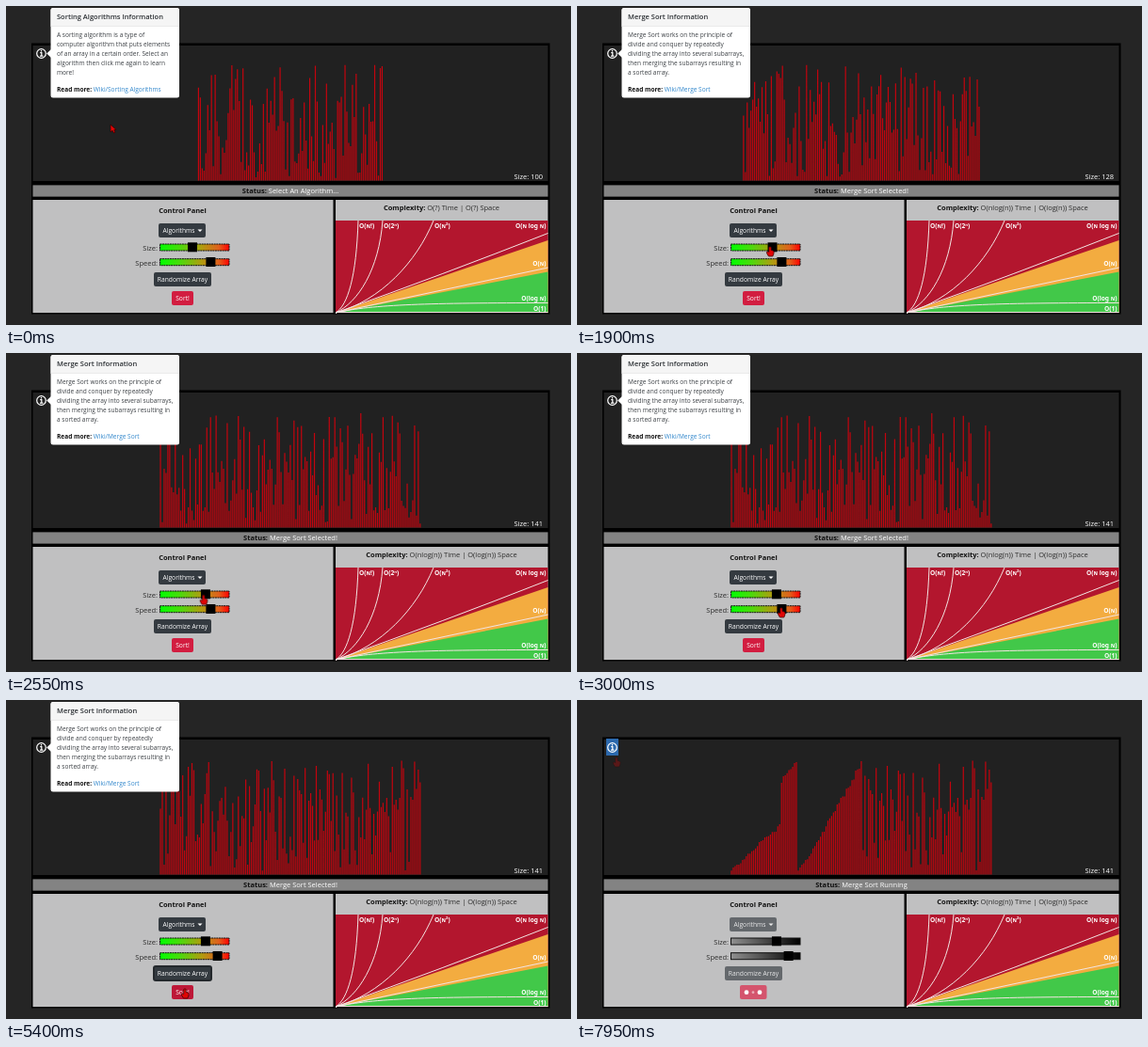
Recreate the animation shown at these times as an HTML page. Size 600 by 339 pixels, loop 8 s.

```html
<!DOCTYPE html>
<html lang="en">
<head>
<meta charset="utf-8">
<title>Sorting visualizer</title>
<style>
  html, body { margin: 0; width: 100%; height: 100%; overflow: hidden; background: #252525; }
  svg { display: block; width: 100vw; height: 100vh; font-family: "Open Sans", "Noto Sans", sans-serif; }
  .ui { font-size: 7.5px; fill: #2b2b2b; }
  .bold { font-weight: 600; }
  .black { font-weight: 700; fill: #111; }
  .white { fill: #fff; }
  .mid { text-anchor: middle; }
  .end { text-anchor: end; }
  .btn text { font-size: 6.7px; fill: #fff; text-anchor: middle; }
  .dark { fill: #343a40; }
  .track { fill: url(#heat); stroke: #111; stroke-dasharray: 2 .6; }
  .curve { fill: none; stroke: #f3e4e2; stroke-width: 1; }
  .label { font: 600 6.6px "Noto Sans", "Open Sans", sans-serif; fill: #fff; }
  .running .btn { opacity: .65; }
  .running .track { fill: url(#gray); stroke-dasharray: none; }
  .focus rect { stroke: #24282c; stroke-width: 2; }
  #sortRunning, .running #sortIdle { display: none; }
  .running #sortRunning { display: inline; }

  #popover, #selection, #cursor, #arrow, #hand { animation: 8s infinite; }
  #popover { animation-name: close; animation-timing-function: linear; }
  #selection { animation-name: select; animation-timing-function: step-end; }
  #cursor { animation-name: travel; animation-timing-function: ease-in-out; }
  #arrow { animation-name: arrow; animation-timing-function: step-end; }
  #hand { animation-name: hand; animation-timing-function: step-end; }

  @keyframes close { 0%, 94% { opacity: 1; } 95.9%, 100% { opacity: 0; } }
  @keyframes select { 0% { opacity: 0; } 94% { opacity: 1; } }
  @keyframes arrow { 0% { opacity: 1; } 5.5% { opacity: 0; } 72% { opacity: 1; } 92.5% { opacity: 0; } }
  @keyframes hand { 0% { opacity: 0; } 5.5% { opacity: 1; } 72% { opacity: 0; } 92.5% { opacity: 1; } 96% { opacity: .3; } }
  @keyframes travel {
    0% { transform: translate(111px, 126px); }
    6.25%, 9% { transform: translate(187px, 234px); }
    14.5%, 16% { transform: translate(200px, 290px); }
    20% { transform: translate(196px, 256px); animation-timing-function: linear; }
    27.5% { transform: translate(214px, 256px); animation-timing-function: linear; }
    31% { transform: translate(209px, 256px); }
    35% { transform: translate(217px, 269px); }
    38% { transform: translate(217px, 271px); animation-timing-function: linear; }
    43%, 48.5% { transform: translate(225px, 271px); }
    52%, 62% { transform: translate(187px, 287px); }
    66.5%, 69.4% { transform: translate(190px, 307px); }
    78%, 86% { transform: translate(113px, 299px); }
    93%, 95% { transform: translate(38px, 51px); }
    98%, 100% { transform: translate(42px, 61px); }
  }
</style>
</head>
<body>
<svg id="app" viewBox="0 0 600 339">
  <defs>
    <linearGradient id="heat">
      <stop offset="0" stop-color="#0f0"/><stop offset=".3" stop-color="#4ed80c"/>
      <stop offset=".6" stop-color="#b09c10"/><stop offset=".85" stop-color="#e0601c"/>
      <stop offset="1" stop-color="#f00"/>
    </linearGradient>
    <linearGradient id="gray">
      <stop offset="0" stop-color="#909090"/><stop offset="1" stop-color="#000"/>
    </linearGradient>
  </defs>

  <rect width="600" height="339" fill="#252525"/>
  <rect x="27" y="39.5" width="550.5" height="288"/>
  <rect x="28.5" y="42" width="547" height="144" fill="#212121"/>
  <rect x="28.5" y="190.4" width="547" height="12.2" fill="#838383"/>
  <rect x="28.5" y="206" width="319" height="120" fill="#c0c0c1"/>
  <rect x="350" y="206" width="225.5" height="120" fill="#c0c0c1"/>

  <path id="bars" fill="#c4040e"/>
  <text id="size" class="ui white end" x="570" y="183.5"></text>
  <text class="ui mid" x="302" y="199.4"><tspan class="black">Status:</tspan> <tspan id="status" class="white"></tspan></text>

  <text class="ui black mid" x="187.5" y="219.8">Control Panel</text>
  <g class="btn">
    <rect class="dark" x="162" y="231" width="50" height="15" rx="2"/>
    <text x="183.5" y="241">Algorithms</text>
    <path d="M203.5 237.5h5l-2.5 2.6z" fill="#fff"/>
  </g>
  <text class="ui end" x="161" y="259.8">Size:</text>
  <rect class="track" x="163.5" y="253" width="73.5" height="7"/>
  <rect id="sizeThumb" y="251.3" width="10" height="10"/>
  <text class="ui end" x="161" y="275.8">Speed:</text>
  <rect class="track" x="163.5" y="268.7" width="73.5" height="7"/>
  <rect id="speedThumb" y="267" width="10" height="10"/>
  <g id="randomize" class="btn">
    <rect class="dark" x="157" y="283" width="61" height="15" rx="2"/>
    <text x="187.5" y="293">Randomize Array</text>
  </g>
  <g id="sortIdle" class="btn">
    <rect id="sortFace" x="176" y="303" width="23" height="15" rx="2"/>
    <text x="187.5" y="313">Sort!</text>
  </g>
  <g id="sortRunning">
    <rect x="173" y="303" width="28.5" height="15" rx="2" fill="#d4546d"/>
    <g id="dots" fill="#fff">
      <circle cx="180" cy="310.7"/><circle cx="187" cy="310.7"/><circle cx="194" cy="310.7"/>
    </g>
  </g>

  <text class="ui mid" x="462.5" y="217"><tspan class="black">Complexity:</tspan> <tspan id="complexity"></tspan></text>
  <rect x="350" y="228" width="225.5" height="98" fill="#b3162e"/>
  <path d="M350 326L575.5 249V326z" fill="#f3ac40"/>
  <path d="M350 326L575.5 282.5V326z" fill="#42c849"/>
  <g class="curve">
    <path d="M350 326C363 318 372 288 374 228"/>
    <path d="M350 326C374 315 396 280 400 228"/>
    <path d="M350 326C398 313 436 272 454 228"/>
    <path d="M350 326Q465 285 575.5 241.5"/>
    <path d="M350 326L575.5 278"/>
    <path d="M350 326C390 317 450 315.500 575.500 315.500"/>
    <path d="M350 325.500H575.500"/>
  </g>
  <g class="label">
    <text x="375" y="236.3">O(ɴ!)</text>
    <text x="401" y="236.3">O(2ⁿ)</text>
    <text x="455" y="236.3">O(ɴ²)</text>
    <text class="end" x="573.5" y="236.3">O(ɴ log ɴ)</text>
    <text class="end" x="573.5" y="276">O(ɴ)</text>
    <text class="end" x="573.5" y="313.3">O(log ɴ)</text>
    <text class="end" x="573.5" y="324.3">O(1)</text>
  </g>

  <rect id="selection" x="31" y="41" width="13" height="18" fill="#2c69ad"/>
  <g fill="none" stroke="#fff" stroke-width="1.2">
    <circle cx="37.5" cy="50.5" r="4.8"/>
    <path d="M36.2 49.6h1.6v3.6m-1.8 0h3.4M37.5 47v1.4"/>
  </g>

  <g id="popover">
    <path d="M43.2 50.5L48 46v9z" fill="#fff"/>
    <rect x="47.5" y="2" width="136.5" height="95.5" rx="2.5" fill="#fff"/>
    <path d="M47.5 21.5V4.5a2.5 2.5 0 0 1 2.5-2.5h131.5a2.5 2.5 0 0 1 2.5 2.5V21.5z" fill="#f5f5f5"/>
    <path d="M47.5 21.5H184" stroke="#e4e4e4" stroke-width=".7"/>
    <text id="title" class="bold" x="54" y="14.4" font-size="7.5" fill="#2b2f33"></text>
    <g id="lines" font-size="6.55" fill="#3c4045"></g>
    <text x="54" y="90.7" font-size="6.55"><tspan class="black">Read more:</tspan> <tspan id="link" fill="#3388cc"></tspan></text>
  </g>

  <g id="cursor" fill="#e00505" stroke="#300" stroke-width=".7">
    <path id="arrow" d="M0 0V8L2 6.3 3.5 9 5 8.3 3.8 5.7 6 5.5z"/>
    <path id="hand" d="M-1.3 .5Q0-1 1.2 .5V3.5Q4 3.5 4.2 5.5 4 8 2.8 10H-1.5Q-3.5 7.5-3.8 5.5-3 4.3-1.3 5.5z"/>
  </g>
</svg>

<script>
const LOOP = 8000, PICK = 1150, SORT_START = 5550, WRITES_PER_MS = 0.165;
const PITCH = 1.97, BAR = 1.2, BASE = 185.5, PEAK = 123;
const el = id => document.getElementById(id);

const general = {
  title: 'Sorting Algorithms Information',
  lines: ['A sorting algorithm is a type of', 'computer algorithm that puts elements',
    'of an array in a certain order. Select an', 'algorithm then click me again to learn', 'more!'],
  link: 'Wiki/Sorting Algorithms',
  complexity: 'O(?) Time | O(?) Space'
};
const merge = {
  title: 'Merge Sort Information',
  lines: ['Merge Sort works on the principle of', 'divide and conquer by repeatedly',
    'dividing the array into several subarrays,', 'then merging the subarrays resulting in', 'a sorted array.'],
  link: 'Wiki/Merge Sort',
  complexity: 'O(nlog(n)) Time | O(log(n)) Space'
};

function randomizer(seed) {
  return () => {
    seed = (seed + 0x6D2B79F5) | 0;
    let x = Math.imul(seed ^ (seed >>> 15), 1 | seed);
    x ^= x + Math.imul(x ^ (x >>> 7), 61 | x);
    return ((x ^ (x >>> 14)) >>> 0) / 4294967296;
  };
}

function randomArray(size, seed) {
  const random = randomizer(seed);
  return Array.from({ length: size }, () => 2 + (PEAK - 2) * random());
}

// Values spread unevenly along a power curve, in shuffled order.
function shuffledRamp(count, power, random) {
  const ramp = Array.from({ length: count }, (_, i) =>
    2 + (PEAK - 2) * ((i + 2 * random()) / (count + 1)) ** power);
  for (let i = count - 1; i > 0; i--) {
    const j = Math.floor(random() * (i + 1));
    [ramp[i], ramp[j]] = [ramp[j], ramp[i]];
  }
  return ramp;
}

function mergeSort(a, lo, hi, writes) {
  if (lo >= hi) return;
  const middle = (lo + hi) >> 1;
  mergeSort(a, lo, middle, writes);
  mergeSort(a, middle + 1, hi, writes);
  const left = a.slice(lo, middle + 1), right = a.slice(middle + 1, hi + 1);
  for (let k = lo; k <= hi; k++) {
    const fromLeft = !right.length || (left.length && left[0] <= right[0]);
    a[k] = (fromLeft ? left : right).shift();
    writes.push([k, a[k]]);
  }
}

const random = randomizer(77);
const finalArray = [...shuffledRamp(36, 0.75, random), ...shuffledRamp(35, 1.1, random), ...randomArray(70, 9)];
const writes = [];
mergeSort(finalArray.slice(), 0, finalArray.length - 1, writes);

function ramp(t, t0, t1, from, to) {
  const p = Math.min(1, Math.max(0, (t - t0) / (t1 - t0)));
  return from + (to - from) * p;
}

function sizeAt(t) {
  const tick = Math.floor(t / 50) * 50;
  return Math.round(tick < 2250 ? ramp(tick, 1600, 2200, 100, 156) : ramp(tick, 2250, 2480, 156, 141));
}

function arrayAt(t) {
  const size = sizeAt(t);
  if (t < 4200) return randomArray(size, size * 31);
  if (t < 4800) return randomArray(size, t < 4500 ? 5 : 6);
  const a = finalArray.slice();
  const done = Math.max(0, Math.floor((t - SORT_START) * WRITES_PER_MS));
  for (const [i, value] of writes.slice(0, done)) a[i] = value;
  return a;
}

function setText(id, text) {
  if (el(id).textContent !== text) el(id).textContent = text;
}

const svgLines = general.lines.map((_, i) => {
  const line = document.createElementNS(el('app').namespaceURI, 'text');
  line.setAttribute('x', 54);
  line.setAttribute('y', 32.5 + 10.2 * i);
  el('lines').append(line);
  return line;
});

let shown;
function showInfo(info) {
  if (shown === info) return;
  shown = info;
  for (const key of ['title', 'link', 'complexity']) setText(key, info[key]);
  svgLines.forEach((line, i) => line.textContent = info.lines[i]);
}

function drawDots(t) {
  const wave = Math.abs(1 - 2 * ((t - SORT_START) / 800 % 1));
  [...el('dots').children].forEach((dot, i) => {
    const swell = i === 1 ? 1 - wave : wave;
    dot.setAttribute('r', 1.4 + swell);
    dot.setAttribute('fill-opacity', 0.5 + swell / 2);
  });
}

function render(t) {
  const running = t >= SORT_START, a = arrayAt(t);
  const left = 302.3 - a.length * PITCH / 2;
  el('bars').setAttribute('d', a.map((h, i) =>
    `M${(left + i * PITCH).toFixed(2)} ${BASE}v${(-h).toFixed(1)}h${BAR}v${h.toFixed(1)}z`).join(''));
  setText('size', 'Size: ' + a.length);
  setText('status', t < PICK ? 'Select An Algorithm...' : running ? 'Merge Sort Running' : 'Merge Sort Selected!');
  showInfo(t < PICK ? general : merge);
  el('sizeThumb').setAttribute('x', 193 + (a.length - 100) * 0.34);
  el('speedThumb').setAttribute('x', ramp(t, 3040, 3440, 212.4, 219.6));
  el('app').classList.toggle('running', running);
  el('randomize').classList.toggle('focus', t >= 4200 && !running);
  el('sortFace').setAttribute('fill', t > 5250 ? '#bd1737' : '#d21d40');
  if (running) drawDots(t);
}

let start;
function frame(now) {
  start ??= now;
  render((now - start) % LOOP);
  requestAnimationFrame(frame);
}
render(0);
requestAnimationFrame(frame);
</script>
</body>
</html>
```
